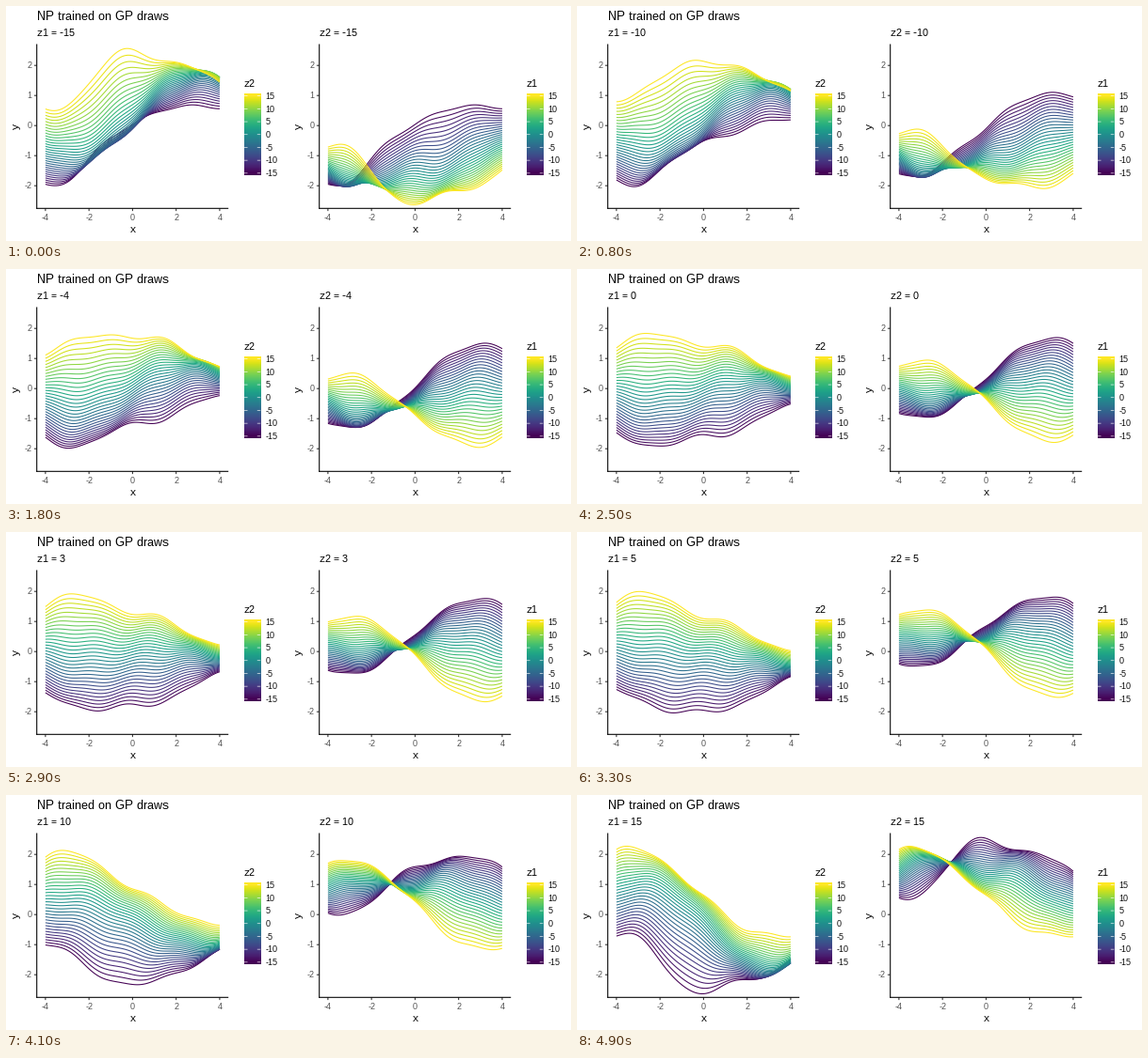
Write a matplotlib script that moves like this. It is 600 px wide and 250 px high and loops after 5000 ms.

```python
import numpy as np
import matplotlib.pyplot as plt
from matplotlib.animation import FuncAnimation
from matplotlib.collections import LineCollection

plt.rcParams["font.family"] = "Liberation Sans"
plt.rcParams["text.hinting"] = "default"
plt.rcParams["text.hinting_factor"] = 1
plt.rcParams["path.snap"] = False

WIDTH, HEIGHT, DPI = 600, 250, 100
PT = 72 / DPI
FRAMES, INTERVAL = 50, 100
Z_MAX = 15
LINE = 1.07


def bump(x, center, width):
    return np.exp(-((x - center) / width) ** 2)


def decode(x, z1, z2):
    """Smooth family of curves: z2 lifts them, z1 tilts them."""
    u, v = z1 / Z_MAX, z2 / Z_MAX
    wave = np.cos(np.pi * (x + .5) / 2)
    lift = 1.8 * bump(x, -1.8, 5.5) - .02 - .14 * wave
    lift_bend = .25 * (wave - 1)
    tilt = -.38 - 1.33 * np.sin(np.pi * x / 6)
    tilt_bend = .25 * (1 + np.tanh((x - 2) / 1.2)) - 1.05 * bump(x, -1, 1.75)
    twist = .23 * bump(x, -1, 2.5) * u * v * (1 + u * v)
    middle = .3 * np.sin(np.pi * x / 4.6) * (1 - u**2) * (1 - v**2)
    ripple = .05 * np.sin(2.8 * x + 2 * (u - v))
    return (v * (lift + lift_bend * u**2) + u * (tilt + tilt_bend * v**2)
            + twist + middle + ripple - .05)


xs = np.linspace(-4, 4, 81)
zs = np.linspace(-Z_MAX, Z_MAX, 31)


def px(x, left):
    return left + 101.7 + 23.13 * x


def py(y):
    return 127.2 - 32 * y


fig = plt.figure(figsize=(WIDTH / DPI, HEIGHT / DPI), dpi=DPI, facecolor="white")
ax = fig.add_axes([0, 0, 1, 1])
ax.axis("off")


def label(x, y, text, size=11, color="black", **kwargs):
    return ax.text(x, y, text, fontsize=size * PT, color=color, **kwargs)


def stroke(x, y, color="black", width=LINE):
    ax.plot(x, y, color=color, lw=width * PT, solid_capstyle="butt")


def draw_legend(x, name):
    top, bottom = 93.5, 180
    half_bin = (bottom - top) / 40
    edge = Z_MAX * 20 / 19
    ax.imshow(np.linspace(edge, -edge, 200)[:, None], cmap="viridis",
              vmin=-Z_MAX, vmax=Z_MAX, aspect="auto",
              extent=(x, x + 17.3, bottom, top), interpolation="bilinear")
    label(x - .3, 86, name)
    for value in range(-Z_MAX, Z_MAX + 1, 5):
        y = np.interp(value, [-Z_MAX, Z_MAX], [bottom - half_bin, top + half_bin])
        for start in (x, x + 13.8):
            stroke([start, start + 3.5], [y, y], "white", .6)
        label(x + 22.5, y + 3.2, str(value), 9)


def draw_panel(left, legend_name):
    """Draw the fixed parts of one plot; return its curves and subtitle."""
    base = 215.3
    for v in range(-4, 5, 2):
        x = px(v, left)
        stroke([x, x], [base, base + 2.8], "#333333")
        label(x, 228, str(v), 9, "#4D4D4D", ha="center")
    for v in range(-2, 3):
        y = py(v)
        stroke([left - 2.8, left], [y, y], "#333333")
        label(left - 5, y + 3.2, str(v), 9, "#4D4D4D", ha="right")
    stroke([left, left], [40.5, base + .5])
    stroke([left - .5, left + 203.5], [base, base])
    label(left + 101.7, 241, "x", ha="center")
    label(left - 22, 128, "y", rotation=90, ha="center", va="center")
    draw_legend(left + 220.3, legend_name)
    lines = LineCollection([], colors=plt.cm.viridis((zs + Z_MAX) / (2 * Z_MAX)),
                           linewidths=LINE * PT, zorder=3)
    ax.add_collection(lines)
    return lines, label(left, 31.7, "")


label(33, 15.2, "NP trained on GP draws", 13.2)
panels = [(left, *draw_panel(left, name)) for left, name in ((32.7, "z2"), (332.7, "z1"))]
ax.set(xlim=(0, WIDTH), ylim=(HEIGHT, 0))


def update(frame):
    z = -Z_MAX + 2 * Z_MAX * frame / (FRAMES - 1)
    each = zs[:, None]
    families = decode(xs, z, each), decode(xs, each, z)
    for (left, lines, subtitle), curves, name in zip(panels, families, ("z1", "z2")):
        lines.set_segments([np.column_stack([px(xs, left), py(curve)])
                            for curve in curves])
        subtitle.set_text(f"{name} = {round(z)}")
    return [artist for panel in panels for artist in panel[1:]]


anim = FuncAnimation(fig, update, frames=FRAMES, interval=INTERVAL,
                     repeat=True, repeat_delay=0, blit=False)
plt.show()
```
